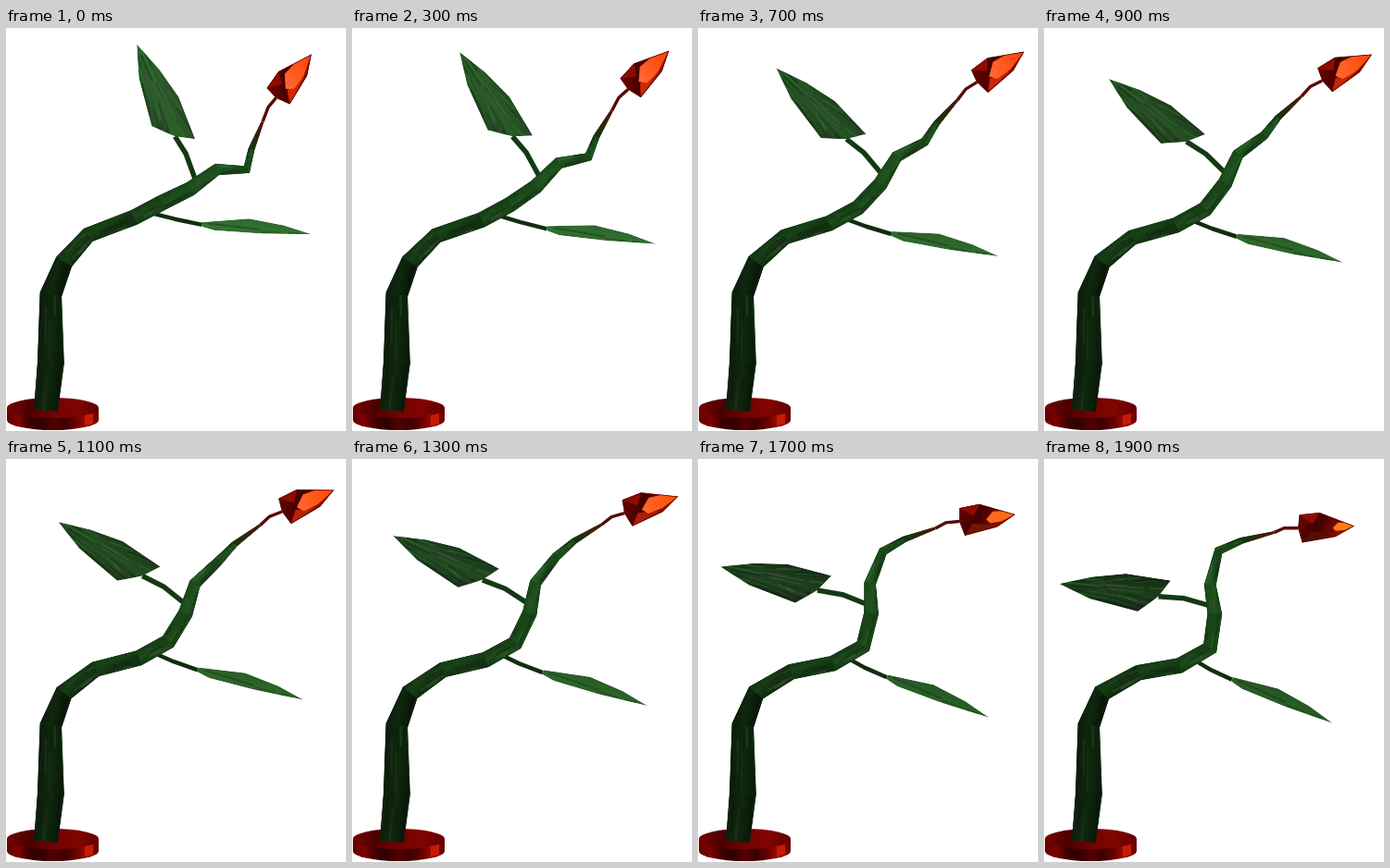
Write an HTML page with a canvas that moves like this. It is 367 px wide and 436 px high and loops after 2000 ms.

```html
<!DOCTYPE html>
<html lang="en">
<head>
<meta charset="utf-8">
<title>Swaying plant</title>
<style>
  html, body { margin: 0; width: 100%; height: 100%; overflow: hidden; background: #fff; }
  canvas { display: block; }
</style>
</head>
<body>
<canvas id="stage" width="367" height="436"></canvas>
<script>
const ctx = document.getElementById('stage').getContext('2d');
const LOOP = 2000, STEP = 100;
const lerp = (a, b, k) => a + (b - a) * k;
const mix = (a, b, k) => [lerp(a[0], b[0], k), lerp(a[1], b[1], k)];
const green = (light, saturation = 48) => `hsl(118,${saturation}%,${light}%)`;

// A bone turns and stretches evenly from its first to its last pose.
const bone = (angle, length, width) => ({ angle, length, width });
const fixed = value => [value, value];
const stem = [
  bone(fixed(-84), fixed(52), 29),
  bone(fixed(-90), fixed(74), 24),
  bone(fixed(-68), fixed(38), 20),
  bone([-48, -29], [39, 45], 17),
  bone([-21, -10], [53, 45], 17),
  bone([-28, -30], [34, 38], 17),
  bone([-26, -82], [34, 37], 16),
  bone([-36, -99], [36, 32], 13),
  bone([0, -76], [32, 38], 10),
  bone([-77, -24], [22.5, 27], 7),
  bone([-68, -14], [32, 36], 3)
];
const topStalk = [bone([-110, -164], [35, 33]), bone([-122, -176], [22, 28])];
const lowStalk = [bone([14, 31], [33, 23]), bone([12, 25], [30, 26])];
const budStalk = [bone([-69, -24], [17, 12]), bone([-50, 0], [13, 15])];

// Outlines lie along the x axis, rooted at the origin.
const topLeaf = {
  angle: [-112.5, -172.6],
  outline: [[0, 0], [-11, 19], [38, 20], [74, 12], [108, 0], [73, -12], [20, -19]]
};
const lowLeaf = {
  angle: [5, 23.5],
  outline: [[0, -3], [50, -11], [88, -7], [119, 0], [62, 4], [14, 5], [0, 2]]
};
const bud = {
  angle: [-51, -2],
  outline: [[0, 0], [2, -14.5], [24, -16], [61, 0], [40, 11], [4, 16]]
};

function chain(start, bones, p) {
  const joints = [start];
  for (const { angle, length } of bones) {
    const a = lerp(...angle, p) * Math.PI / 180, size = lerp(...length, p);
    const [x, y] = joints.at(-1);
    joints.push([x + size * Math.cos(a), y + size * Math.sin(a)]);
  }
  return joints;
}

function trace(points) {
  ctx.beginPath();
  points.forEach(p => ctx.lineTo(...p));
}

function fill(points, style) {
  trace(points);
  ctx.fillStyle = style;
  ctx.fill();
}

function line(points, style, width) {
  trace(points);
  ctx.strokeStyle = style;
  ctx.lineWidth = width;
  ctx.stroke();
}

function gradient(from, to, colors) {
  const g = ctx.createLinearGradient(...from, ...to);
  colors.forEach((c, i) => g.addColorStop(i / (colors.length - 1), c));
  return g;
}

function grain(seed, count) {
  const random = () => (seed = (seed * 16807) % 2147483647) / 2147483647;
  return Array.from({ length: count }, () => ({
    u: random(), v: random(), length: 0.1 + random() * 0.25,
    tone: ['#0a160a', '#39853a', '#514f4c'][Math.floor(random() * 3)],
    width: 1 + random() * 2
  }));
}
const stemGrain = grain(41, 70), topGrain = grain(97, 45), lowGrain = grain(23, 25);

// Draws in the frame of a part that grows from root at its current angle.
function rooted(root, part, p, paint) {
  ctx.save();
  ctx.translate(...root);
  ctx.rotate(lerp(...part.angle, p) * Math.PI / 180);
  trace(part.outline);
  ctx.closePath();
  ctx.clip();
  paint(part.outline);
  ctx.restore();
}

function drawLeaf(root, leaf, p, light, streaks) {
  rooted(root, leaf, p, outline => {
    fill(outline, gradient([0, -18], [0, 18], [green(light - 3, 38), green(light + 2, 42), green(light - 2, 36)]));
    ctx.globalAlpha = 0.3;
    for (const s of streaks) {
      const x = s.u * 110 - 10, y = (s.v - 0.5) * 40;
      line([[x, y], [x + s.length * 120, y * 0.7]], s.tone, s.width);
    }
  });
}

function drawStem(joints) {
  const widths = [26, ...stem.map(b => b.width)];
  const last = joints.length - 1;
  const edge = side => joints.map(([x, y], i) => {
    const [ax, ay] = joints[Math.max(0, i - 1)], [bx, by] = joints[Math.min(last, i + 1)];
    const back = Math.atan2(y - ay, x - ax), ahead = Math.atan2(by - y, bx - x);
    const a = i === 0 ? ahead : i === last ? back : (back + ahead) / 2;
    const reach = side * widths[i] / 2;
    return [x - Math.sin(a) * reach, y + Math.cos(a) * reach];
  });
  const left = edge(-1), right = edge(1);
  const outline = [...left, ...right.reverse()];
  right.reverse();

  ctx.save();
  trace(outline);
  ctx.clip();
  fill(outline, green(14));
  for (let i = 0; i < last; i++) {
    const light = i < 3 ? 8 : Math.min(20, 9 + i * 1.5);
    const shades = i < last - 1 ? [light, light + 2.5, light - 2].map(l => green(l))
                                : [green(14), '#5a100a'];
    const from = i < last - 1 ? left[i] : joints[i], to = i < last - 1 ? right[i] : joints[last];
    const quad = [left[i], left[i + 1], right[i + 1], right[i]];
    fill(quad, gradient(from, to, shades));
    line(quad.slice(0, 2), green(light - 2), 1);
  }
  ctx.globalAlpha = 0.22;
  for (const s of stemGrain) {
    const place = s.u * (last - 1), i = Math.floor(place), k = place - i;
    const at = n => mix(mix(left[i], left[i + 1], n), mix(right[i], right[i + 1], n), s.v);
    line([at(k), at(Math.min(1, k + s.length * 2))], s.tone, s.width);
  }
  ctx.restore();
}

function drawBase() {
  const rim = (y, style, end) => {
    ctx.beginPath();
    ctx.ellipse(50.5, y, 49.5, 11, 0, 0, end);
    if (end < 4) { ctx.lineTo(1, 411); ctx.lineTo(100, 411); }
    ctx.fillStyle = style;
    ctx.fill();
  };
  rim(424, gradient([1, 0], [100, 0], ['#650000', '#7c0200', '#3c0000', '#300000',
    '#520000', '#3c0000', '#660000', '#a00c00', '#5c0000']), Math.PI);
  rim(411, gradient([1, 405], [100, 415], ['#780402', '#4c0000', '#700200', '#820400', '#600000']), 7);
  fill([[85, 419], [94, 417], [94, 428], [85, 430]], '#c41a08');
}

function drawBud(root, p) {
  rooted(root, bud, p, outline => {
    const shrink = 1 - 0.5 * p ** 4;
    const shine = [[26, -9], [42, -8], [60, 0], [38, 8], [20, 9], [14, 2]]
      .map(point => mix([61, 0], point, shrink));
    fill(outline, gradient([0, -14], [40, 14], ['#6a0600', '#430000', '#8c1000']));
    fill([[2, -14], [24, -16], [16, -4]], '#8f0b00');
    fill([[4, 16], [14, 4], [38, 9]], `hsl(10,95%,${lerp(42, 16, p ** 3)}%)`);
    fill(shine, gradient([15, 0], [61, 0], ['#ff6a32', `hsl(${14 + 16 * p ** 4},100%,51%)`]));
    line([...outline, outline[0]], '#5c0400', 1.6);
  });
}

function draw(p) {
  ctx.fillStyle = '#fff';
  ctx.fillRect(0, 0, 367, 436);
  drawBase();

  const joints = chain([43, 414], stem, p);
  const top = chain(mix(joints[7], joints[8], 0.25), topStalk, p);
  const low = chain(mix(joints[5], joints[6], 0.4), lowStalk, p);
  const tip = chain(joints.at(-1), budStalk, p);

  line(top, green(15), 5.5);
  line(low, green(12), 4.5);
  drawLeaf(top.at(-1), topLeaf, p, lerp(25, 15, p), topGrain);
  drawLeaf(low.at(-1), lowLeaf, p, lerp(30, 24, p), lowGrain);
  drawStem(joints);
  line(tip, '#560b08', 3.4);
  drawBud(tip.at(-1), p);
}

ctx.lineJoin = 'round';
const start = performance.now();
function tick() {
  const t = (performance.now() - start) % LOOP;
  draw(Math.floor(t / STEP) * STEP / (LOOP - STEP));
  requestAnimationFrame(tick);
}
tick();
</script>
</body>
</html>
```
